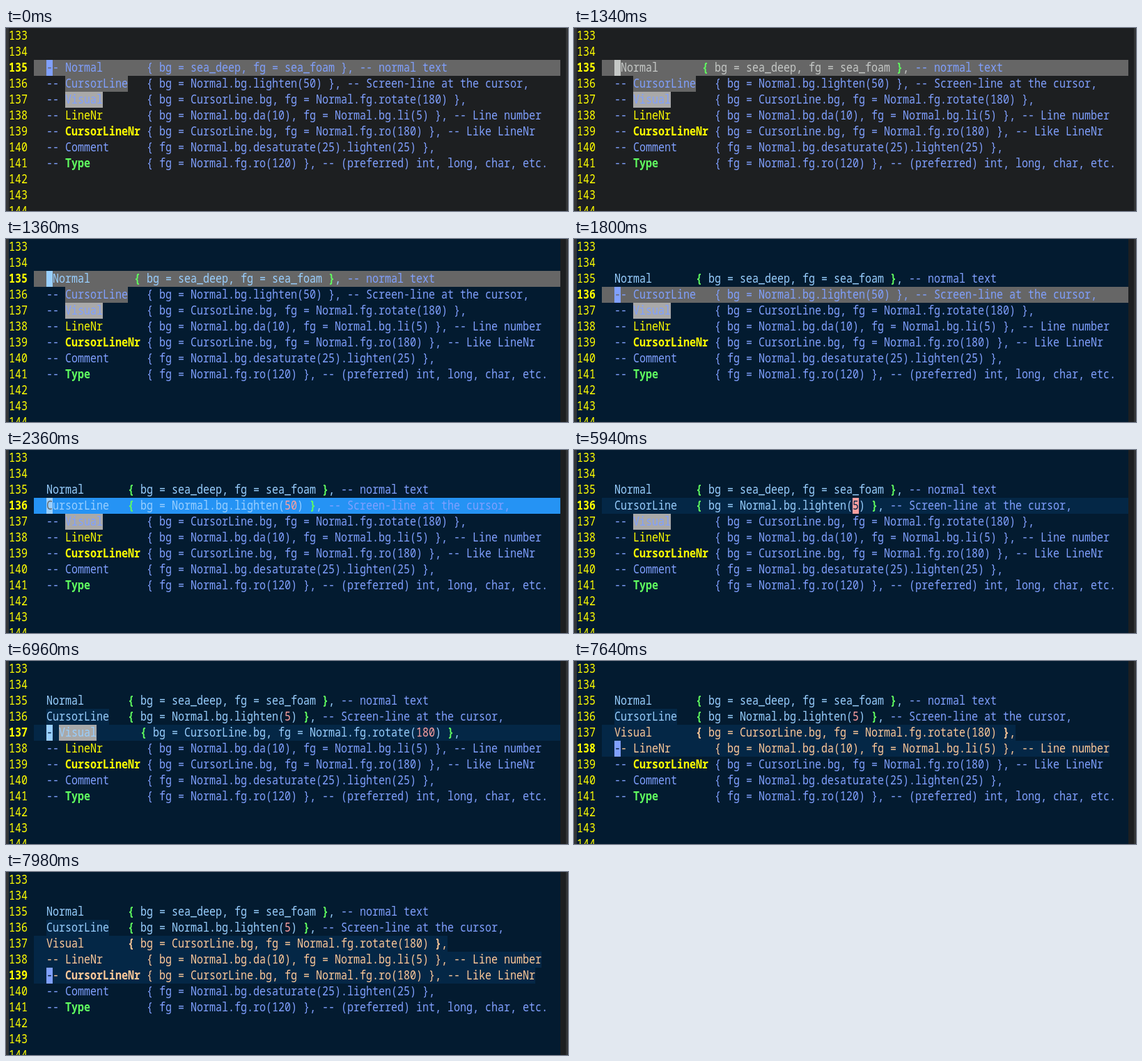
These frames come from a looping animation (807 by 264 pixels, 8 s). An HTML page with a canvas:

```html
<!DOCTYPE html>
<html lang="en">
<head>
<meta charset="utf-8">
<title>Live colour scheme editing</title>
<style>
  html, body { margin: 0; height: 100%; overflow: hidden; background: #1d1f21; }
  canvas { display: block; }
</style>
</head>
<body>
<canvas id="stage" width="807" height="264"></canvas>
<script>
const ctx = document.getElementById('stage').getContext('2d');
const LOOP = 8000;
const CELL = 9, ROW = 23, LEFT = 4, TEXT_X = 58, BAND_X = 40, RIGHT = 796;
const FIRST = 133, LAST = 144;

const TERMINAL = '#1d1f21', EDGE = '#333537';
const COMMENT = '#80a0ff', YELLOW = '#ffff00', GREEN = '#60ff60', NUMBER = '#ffa0a0';
const DEEP = 'hsl(208 90% 10%)', FOAM = 'hsl(208 100% 80%)', SAND = 'hsl(28 100% 80%)';
const BRIGHT = 'hsl(208 90% 55%)', DIM = 'hsl(208 90% 14.5%)';

const groups = {
  135: ['Normal', '{ bg = sea_deep, fg = sea_foam },', ' -- normal text'],
  136: ['CursorLine', '{ bg = Normal.bg.lighten(ARG) },', ' -- Screen-line at the cursor,'],
  137: ['Visual', '{ bg = CursorLine.bg, fg = Normal.fg.rotate(180) },', ''],
  138: ['LineNr', '{ bg = Normal.bg.da(10), fg = Normal.bg.li(5) },', ' -- Line number'],
  139: ['CursorLineNr', '{ bg = CursorLine.bg, fg = Normal.fg.ro(180) },', ' -- Like LineNr'],
  140: ['Comment', '{ fg = Normal.bg.desaturate(25).lighten(25) },', ''],
  141: ['Type', '{ fg = Normal.fg.ro(120) },', ' -- (preferred) int, long, char, etc.'],
};

// Moments at which each leading "-- " loses one more character.
const deletions = {
  135: [1220, 1320, 1440],
  136: [2160, 2260, 2360],
  137: [6960, 7060, 7160],
};

// [time, line, column]
const cursorTrack = [
  [0, 135, 0], [1800, 136, 0], [3660, 136, 38], [5460, 136, 39], [5940, 136, 38],
  [6360, 137, 38], [6560, 137, 0], [7640, 138, 0], [7730, 139, 0], [7820, 140, 0], [7980, 139, 0],
];

function stateAt(t) {
  const [, line, col] = cursorTrack.findLast(([time]) => time <= t);
  const themed = t >= 1360;
  return {
    t, line, col,
    bg: themed ? DEEP : TERMINAL,
    fg: themed ? FOAM : '#c5c8c6',
    band: t < 2280 ? '#666666' : t < 5480 ? BRIGHT : DIM,
    visual: t < 7080 ? { bg: '#a9a9a9' } : { bg: DIM, fg: SAND },
    arg: t < 4600 ? '50' : t < 5460 ? '' : '5',
    selecting: t >= 7380,
    shape: t >= 4500 && t < 4600 ? 'under' : t >= 4620 && t < 5940 ? 'bar' : 'block',
  };
}

function nameStyle(name, s) {
  switch (name) {
    case 'CursorLine': return { bg: s.band };
    case 'Visual': return s.visual;
    case 'LineNr': return { fg: YELLOW };
    case 'CursorLineNr': return { fg: YELLOW, bold: true };
    case 'Type': return { fg: GREEN, bold: true };
    default: return {};
  }
}

function lineCells(line, s) {
  const [name, body, tail] = groups[line];
  const removed = (deletions[line] || []).filter(time => time <= s.t).length;
  const isCode = removed > 0;
  const base = isCode ? s.fg : COMMENT;
  const cells = [];
  const add = (text, style) => {
    for (const ch of text) cells.push({ ch, fg: base, ...style });
  };

  add('-- '.slice(removed));
  add(name, nameStyle(name, s));
  add(' '.repeat(13 - name.length));
  for (const part of body.replace('ARG', s.arg).split(/([{}]|\d+)/)) {
    const brace = /[{}]/.test(part);
    add(part, !isCode ? {} : brace ? { fg: GREEN, bold: true } : /\d/.test(part) ? { fg: NUMBER } : {});
  }
  add(tail, { fg: COMMENT });

  if (s.selecting && line >= 137 && line <= s.line) {
    for (const cell of cells) Object.assign(cell, { fg: SAND, bg: DIM });
  }
  return cells;
}

function rect(color, x, y, w, h) {
  ctx.fillStyle = color;
  ctx.fillRect(x, y, w, h);
}

// A tall, narrow terminal face: half as wide as its line size.
function glyph(ch, x, top, color, bold) {
  if (ch === ' ') return;
  ctx.save();
  ctx.translate(x, top + 17);
  ctx.scale(1, 1.2);
  ctx.font = `${bold ? 'bold ' : ''}15px "Noto Sans Mono", "DejaVu Sans Mono", monospace`;
  ctx.fillStyle = color;
  ctx.fillText(ch, 0, 0);
  ctx.restore();
}

function drawCursor(cell, x, top, s) {
  if (s.shape === 'bar') return rect(cell.fg, x, top, 1, ROW);
  if (s.shape === 'under') return rect(cell.fg, x, top + ROW - 5, CELL, 5);
  const stale = s.t >= 2280 && s.t < 3080;
  const under = stale ? '#666666' : cell.bg || (s.selecting ? s.bg : s.band);
  rect(cell.fg, x, top, CELL, ROW);
  glyph(cell.ch, x, top, under, cell.bold);
}

function drawLine(line, s) {
  const top = (line - FIRST) * ROW;
  const current = line === s.line;
  [...String(line)].forEach((ch, i) => glyph(ch, LEFT + i * CELL, top, YELLOW, current));
  if (!groups[line]) return;

  const cells = lineCells(line, s);
  if (s.selecting && line >= 137 && line <= s.line) {
    rect(DIM, BAND_X, top, TEXT_X - BAND_X + cells.length * CELL, ROW);
  } else if (current && !s.selecting) {
    rect(s.band, BAND_X, top, RIGHT - BAND_X, ROW);
  }

  cells.forEach((cell, i) => {
    if (cell.bg) rect(cell.bg, TEXT_X + i * CELL, top, CELL, ROW);
  });
  cells.forEach((cell, i) => glyph(cell.ch, TEXT_X + i * CELL, top, cell.fg, cell.bold));

  if (current) {
    const cell = { ...cells[s.col] };
    if (s.selecting && line > 137) Object.assign(cell, { fg: COMMENT, bg: s.bg });
    drawCursor(cell, TEXT_X + s.col * CELL, top, s);
  }
}

function frame(now) {
  const s = stateAt(now % LOOP);
  rect(TERMINAL, 0, 0, 807, 264);
  rect(EDGE, 0, 0, LEFT, 264);
  rect(EDGE, 804, 0, 3, 264);
  rect(s.bg, LEFT, 0, RIGHT - LEFT, 264);
  for (let line = FIRST; line <= LAST; line++) drawLine(line, s);
}

let start;
function tick(now) {
  start ??= now;
  frame(now - start);
  requestAnimationFrame(tick);
}
frame(0);
requestAnimationFrame(tick);
</script>
</body>
</html>
```
